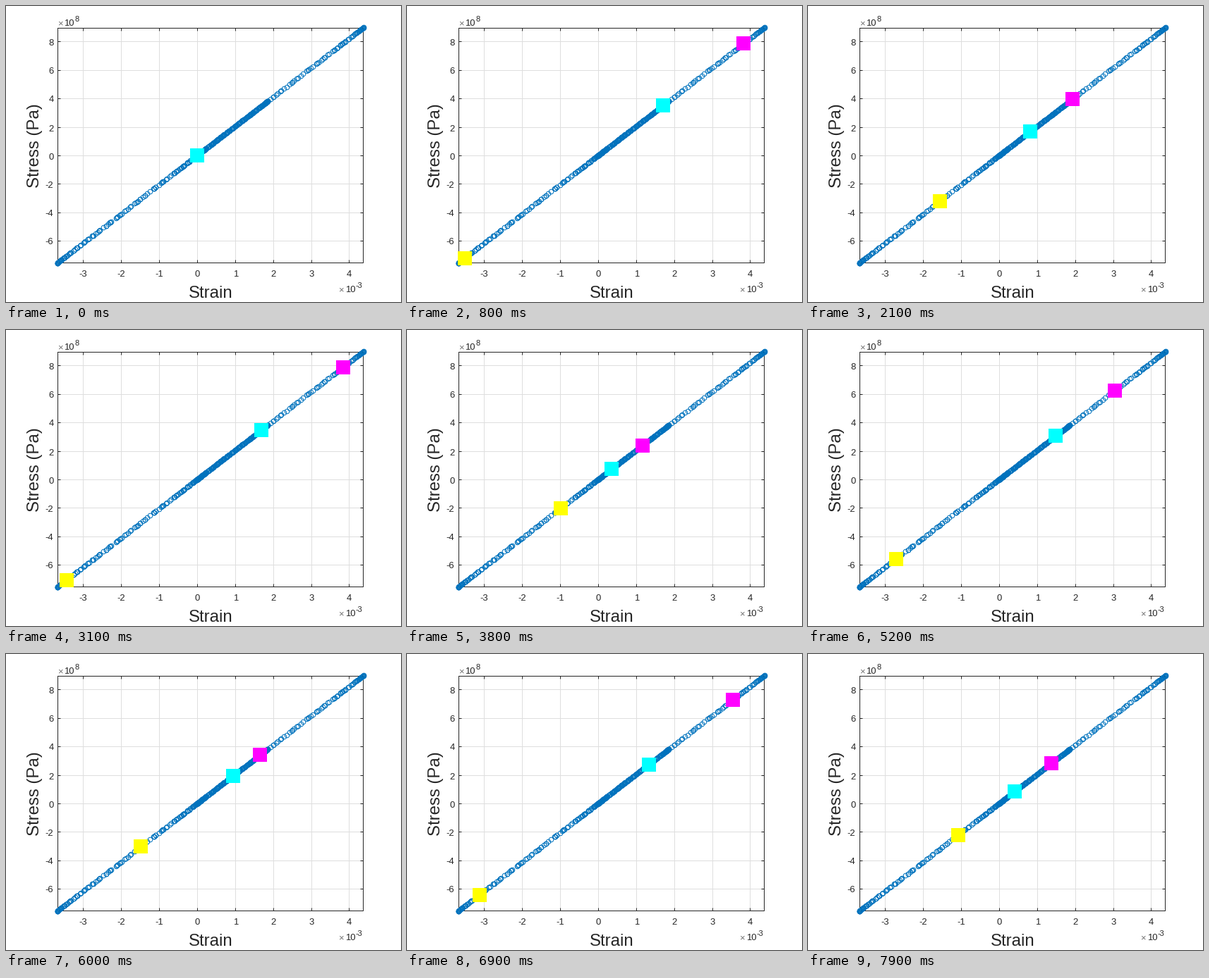
Recreate the animation shown at these times as a matplotlib script. Size 560 by 420 pixels, loop 8 s.

```python
import numpy as np
import matplotlib.pyplot as plt
from matplotlib.animation import FuncAnimation

W, H, FRAMES, STEP = 560, 420, 80, 100
LEFT, RIGHT, TOP, BOTTOM = 73, 506, 31, 364
INK, GRID, BLUE = "#262626", "#dedede", "#0072BD"
MODULUS = 2.052     # stress (1e8 Pa) per strain (1e-3)
FREQ = 0.1796       # oscillations per frame

plt.rcParams["font.family"] = "Liberation Sans"


def px(strain):
    return 271 + 53.85 * strain


def py(stress):
    return 212 - 20.2 * stress


fig = plt.figure(figsize=(W / 72, H / 72), dpi=72, facecolor="white")
ax = fig.add_axes([0, 0, 1, 1])
ax.set(xlim=(0, W), ylim=(H, 0))
ax.axis("off")


def line(xs, ys, color=INK, z=2):
    ax.plot(xs, ys, color=color, lw=1, zorder=z, solid_capstyle="butt")


def label(x, y, s, size=13, **kw):
    kw = {"ha": "center", "va": "baseline", **kw}
    ax.text(x, y, s, fontsize=size, color=INK, **kw)


def power(x, y, exponent):
    label(x, y, "×", ha="left", alpha=0.65)
    label(x + 9.5, y, "10", ha="left")
    label(x + 24.5, y - 5.5, exponent, 11, ha="left")


# Axes box, grid, ticks and labels
for e in range(-3, 5):
    x = round(px(e))
    line([x, x], [TOP, BOTTOM], GRID, 1)
    line([x, x], [BOTTOM, BOTTOM - 4])
    line([x, x], [TOP, TOP + 4])
    label(x + 0.5, 384.5, str(e))
for s in range(-6, 9, 2):
    y = round(py(s))
    line([LEFT, RIGHT], [y, y], GRID, 1)
    line([LEFT, LEFT + 4], [y, y])
    line([RIGHT, RIGHT - 4], [y, y])
    label(67.5, y + 5.5, str(s), ha="right")
line([LEFT, RIGHT, RIGHT, LEFT, LEFT], [TOP, TOP, BOTTOM, BOTTOM, TOP])
label(290, 414, "Strain", 24)
label(46.5, 198.5, "Stress (Pa)", 24, rotation=90, rotation_mode="anchor")
power(73, 28, "8")
power(471.5, 406, "-3")

# Recorded samples along the elastic line
rng = np.random.default_rng(7)


def samples(low, high, count, jitter=0.03):
    """Strains of an even swing, dense near both turning points."""
    phase = np.linspace(0, np.pi, count)
    spread = rng.normal(0, jitter, count)
    swept = low + (high - low) * (1 - np.cos(phase)) / 2 + spread
    return np.clip(swept, min(low, high), max(low, high))


strain = np.concatenate([
    samples(0, 4.38, 125),
    samples(0, 1.85, 200),
    samples(0, -3.68, 130),
])
ax.plot(px(strain), py(MODULUS * strain), "o", ms=6.6, mfc="none",
        mec=BLUE, mew=1, zorder=3)


# Three points of the beam: main bending mode plus a faster ripple
def bend(n):
    return 1 - np.cos(2 * np.pi * FREQ * n)


def ripple(n, freq):
    return np.sin(2 * np.pi * freq * n)


tracks = {
    "magenta": lambda n: 2.07 * bend(n) + 0.15 * ripple(n, 0.343),
    "yellow": lambda n: -1.84 * (1 - n / 1500) * bend(n),
    "cyan": lambda n: 0.88 * bend(n) + 0.0035 * n * ripple(n, 0.3872),
}
markers = {
    color: ax.plot([], [], "s", ms=20, color=color, mew=0, zorder=4 + i)[0]
    for i, color in enumerate(tracks)
}


def draw(n):
    for color, mark in markers.items():
        e = tracks[color](n)
        mark.set_data([px(e)], [py(MODULUS * e)])
    return list(markers.values())


anim = FuncAnimation(fig, draw, frames=FRAMES, interval=STEP,
                     repeat=True, repeat_delay=0, blit=False)
plt.show()
```
